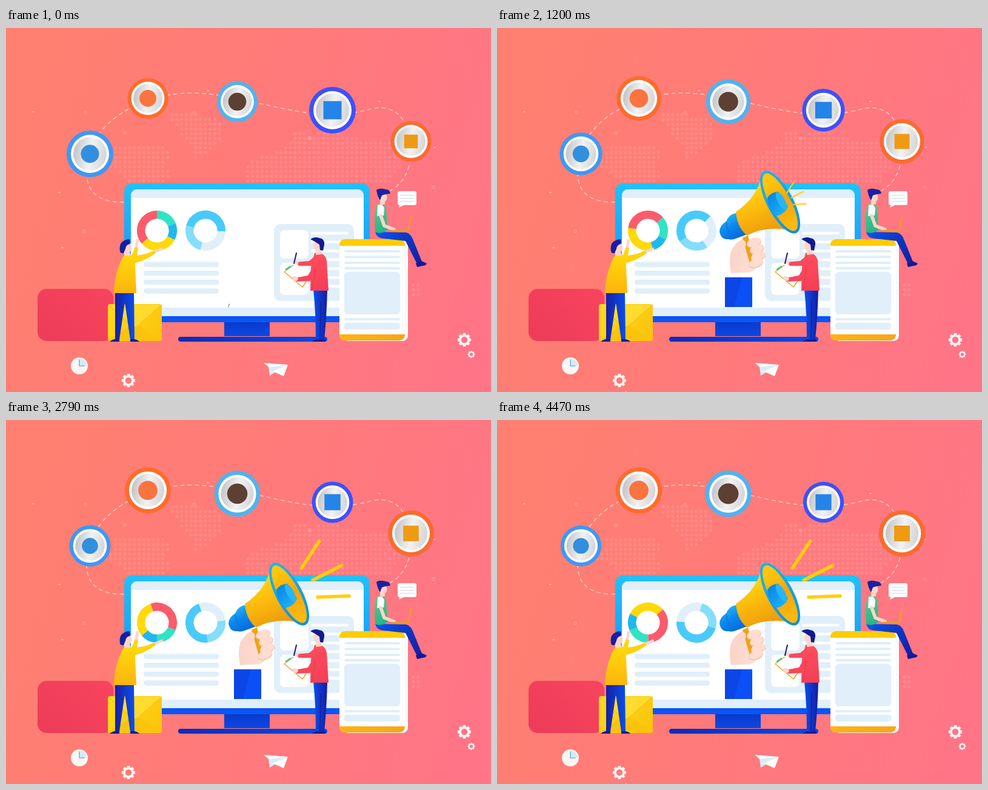
An HTML page with a canvas for the animation above (4500 ms loop, 800 px wide and 600 px high).

```html
<!DOCTYPE html>
<html lang="en">
<head>
<meta charset="utf-8">
<title>Marketing desk</title>
<style>
html, body { margin: 0; width: 100%; height: 100%; overflow: hidden; background: #ff7b7b; }
canvas { display: block; width: 800px; height: 600px; }
</style>
</head>
<body>
<canvas id="stage" width="800" height="600"></canvas>
<script>
const LOOP = 4500, STEP = 30, TAU = Math.PI * 2;
const PALE = '#e0eff9', NAVY = '#14189a', SKIN = '#fcd5cb';
const stage = document.getElementById('stage').getContext('2d');
let c = stage;

const clamp = v => Math.max(0, Math.min(1, v));

function grad(x0, y0, x1, y1, ...colors) {
  const g = c.createLinearGradient(x0, y0, x1, y1);
  colors.forEach((color, i) => g.addColorStop(i / (colors.length - 1), color));
  return g;
}

function shape(d, fill) {
  c.fillStyle = fill;
  c.fill(new Path2D(d));
}

function stroke(d, color, width, cap = 'round') {
  c.strokeStyle = color;
  c.lineWidth = width;
  c.lineCap = cap;
  c.lineJoin = 'round';
  c.stroke(new Path2D(d));
}

function box(x0, y0, x1, y1, r, fill) {
  c.fillStyle = fill;
  c.beginPath();
  c.roundRect(x0, y0, x1 - x0, y1 - y0, r);
  c.fill();
}

function oval(x, y, rx, ry, fill, turn = 0) {
  c.fillStyle = fill;
  c.beginPath();
  c.ellipse(x, y, rx, ry, turn, 0, TAU);
  c.fill();
}

const disc = (x, y, r, fill) => oval(x, y, r, r, fill);

// Runs a drawing with everything scaled about one point.
function scaled(x, y, s, draw) {
  c.save();
  c.translate(x, y);
  c.scale(s, s);
  c.translate(-x, -y);
  draw();
  c.restore();
}

function layer(draw) {
  const canvas = document.createElement('canvas');
  canvas.width = 800;
  canvas.height = 600;
  c = canvas.getContext('2d');
  draw();
  c = stage;
  return canvas;
}

function worldMap() {
  const land = new Path2D(
    'M172 192 L263 190 L270 212 L262 228 L273 246 L250 256 L200 256 L190 240 L158 228 L176 212Z ' +
    'M272 143 L300 139 L338 150 L357 152 L358 182 L330 205 L314 215 L300 186 L275 158Z ' +
    'M400 218 L440 206 L468 190 L476 172 L494 169 L500 178 L530 168 L580 182 L658 192 L655 220 L632 256 L396 256Z ' +
    'M668 420 L680 420 L680 441 L668 441Z');
  for (let y = 143; y < 445; y += 7.8) {
    for (let x = 126; x < 690; x += 7.8) {
      if (c.isPointInPath(land, x, y)) disc(x, y, 2.7, 'rgba(255,190,185,.22)');
    }
  }
}

function specks() {
  c.strokeStyle = 'rgba(255,255,255,.32)';
  c.lineWidth = 1;
  for (const [x, y] of [[131, 139], [196, 173], [310, 139], [501, 182], [705, 262], [129, 335]]) {
    c.beginPath();
    c.arc(x, y, 2.4, 0, TAU);
    c.stroke();
  }
  for (const [x, y] of [[45, 138], [333, 103], [616, 121], [707, 197], [93, 362], [88, 271]]) {
    oval(x, y, 2, .9, 'rgba(255,255,255,.45)');
  }
}

function gear(x, y, r) {
  c.save();
  c.translate(x, y);
  c.strokeStyle = c.fillStyle = '#fff6f4';
  c.lineWidth = r * .34;
  c.beginPath();
  c.arc(0, 0, r * .65, 0, TAU);
  c.stroke();
  for (let i = 0; i < 8; i++) {
    c.rotate(TAU / 8);
    c.fillRect(-r * .21, -r, r * .42, r * .34);
  }
  c.restore();
}

function monitor() {
  box(195, 256, 600, 485, 13, grad(0, 256, 0, 480, '#20c2fb', '#19a0fa', '#0a55f7'));
  box(195, 470, 600, 485, [0, 0, 10, 10], '#0a55f7');
  box(206, 266, 590, 475, [10, 10, 0, 0], '#fff');
  box(206, 266, 590, 280, [10, 10, 0, 0], PALE);
  box(206, 461, 590, 475, 0, PALE);
  box(360, 485, 435, 508, 0, grad(0, 485, 0, 508, '#0a3ac8', '#0a48e8'));
  box(284, 509, 530, 517, 4, grad(284, 0, 530, 0, '#0f2ab8', '#0a4ae6'));
  for (let i = 0; i < 4; i++) box(227, 385.5 + i * 14.6, 351, 394 + i * 14.6, 4, PALE);
  box(442, 323, 574, 450, 11, PALE);
  box(452, 333, 499, 380, 7, '#fff');
  box(452, 387, 499, 440, 7, '#fff');
  for (let y = 336; y < 435; y += 14.6) box(503, y, 565, y + 4.5, 2, '#fff');
}

function backdrop() {
  c.fillStyle = grad(0, 180, 800, 420, '#ff8070', '#ff7a7a', '#ff7587');
  c.fillRect(0, 0, 800, 600);
  worldMap();
  specks();
  c.setLineDash([7, 5]);
  stroke('M195 287 C150 288 132 268 133 236 C134 188 165 150 212 129 C262 105 310 102 368 114 ' +
    'C430 126 465 136 500 140 C540 145 570 142 600 134 C645 122 668 155 668 205 Q666 250 634 268',
    'rgba(255,235,230,.72)', 1.5, 'butt');
  c.setLineDash([]);
  monitor();
}

function tablet() {
  box(556, 350, 663, 516, 9, grad(650, 0, 663, 0, '#dcecf6', '#ffffff'));
  box(550, 348, 658, 515, 9, '#fff');
  box(550, 348, 658, 359, [9, 9, 0, 0], '#ffcc00');
  box(550, 505, 658, 515, [0, 0, 9, 9], grad(550, 0, 658, 0, '#ffb30f', '#f9a51a'));
  for (const y of [366, 375.5, 385, 394]) box(558, y, 650, y + 4, 2, PALE);
  box(558, 402, 650, 472, 6, PALE);
  box(558, 478, 650, 482, 2, PALE);
  box(558, 486, 650, 497, 4, PALE);
}

function redTile() {
  box(52, 430, 177, 516, 15, grad(150, 430, 80, 516, '#f7435d', '#ed3d59'));
}

function envelope() {
  box(168, 455, 257, 516, 4, grad(168, 455, 257, 516, '#ffd91c', '#fbc30c'));
  shape('M169 515 L212 486 L257 515Z', '#f9c40b');
  shape('M169 456 L256 456 L217 491 Q212 495 207 491Z', '#ffdb2e');
  stroke('M170 457 L207 491 Q212 495 217 491 L256 457', '#efbb0b', 1);
}

function reachingMan() {
  stroke('M212 379 L217 350', SKIN, 4.5);
  stroke('M240 371 L257 364', SKIN, 4.5);
  shape('M180 436 L211 436 L212 514 L205 514 L196 452 L187 514 L180 514Z', grad(180, 0, 213, 0, '#1520a5', '#0a50ed'));
  shape('M171 517 Q178 511 187 513 L187 517Z M205 517 L205 513 Q215 512 220 517Z', NAVY);
  shape('M193 377 Q204 371 213 376 L213 392 L215 437 L178 437 Q179 403 193 377Z', grad(0, 374, 0, 437, '#ffd90c', '#fbb50d'));
  shape('M206 376 Q228 375 244 367 L247 371 Q229 384 211 388Z', '#ffd20b');
  shape('M206 378 L213 361 L218 363 L215 382Z', '#ffd60c');
  shape('M195 366 L203 366 L206 375 L195 376Z', SKIN);
  oval(201, 362, 6.5, 8, SKIN);
  shape('M188 368 Q185 351 202 348 Q206 348 204 356 Q198 357 197 364 L194 371 Q189 372 188 368Z', '#161fa0');
}

function writingMan() {
  shape('M507 431 L530 431 Q529 475 525 514 L511 514 Q511 470 507 431Z', grad(507, 0, 530, 0, '#0a50ed', '#151ca0'));
  stroke('M519 450 L518 513', '#151c96', 1.2);
  shape('M504 517 Q510 512 518 514 L527 513 L527 517Z', NAVY);
  shape('M509 371 Q525 368 529 383 L532 433 L502 433 L503 394Z', grad(500, 370, 532, 433, '#ff515f', '#f33d56'));
  shape('M459 402 L474 391 L501 410 L489 427Z', '#fff');
  stroke('M474 391 L459 402 L489 427 L501 410', '#f7a11d', 1.5);
  stroke('M462 398 L469 393', '#37c6b4', 2.5);
  shape('M512 374 L509 392 L483 392 L478 386 L500 384Z', '#fb4a5c');
  oval(478, 386, 4.5, 3, SKIN, .5);
  shape('M518 382 Q529 386 523 397 L502 417 L479 418 L477 412 L498 408 L509 390Z', '#f94659');
  oval(477, 413, 5, 3.5, SKIN, .4);
  stroke('M475 388 L479 371', '#161c85', 2);
  stroke('M510 397 L505 432', '#df3651', .8);
  shape('M512 365 L520 365 L521 373 L511 374Z', SKIN);
  oval(514, 359, 7, 8.5, SKIN);
  shape('M502 348 Q510 343 516 346 Q526 347 525 357 L523 367 L518 366 L517 357 Q510 352 502 348Z', '#111b91');
}

function seatedMan() {
  shape('M609 336 L659 337 Q667 338 671 348 L686 385 L678 389 L659 351 L622 347 Q611 346 609 336Z',
    grad(610, 335, 688, 388, '#0a55ea', '#151ca0'));
  shape('M676 388 L685 384 L694 388 L692 391 L678 394Z', NAVY);
  shape('M612 291 Q622 287 627 295 L629 333 Q618 341 609 336 Q606 303 612 291Z', grad(608, 290, 628, 336, '#58cb92', '#24b486'));
  shape('M613 292 Q621 289 624 297 L623 309 L612 310Z', '#fff');
  stroke('M618 309 L624 326 L640 332', SKIN, 5.5);
  stroke('M636 334 L664 334', '#f29a22', 2.5);
  stroke('M664 333 L668 309', '#f3a020', 2.2);
  shape('M617 282 L625 282 L625 290 L617 293Z', SKIN);
  oval(622, 279, 6.5, 8, SKIN);
  shape('M611 267 Q616 263 626 266 Q633 266 634 273 Q625 274 620 276 L617 284 Q612 276 611 267Z', '#1a22a2');
}

function bubble() {
  box(646, 269, 677, 292, 3, '#fff');
  shape('M650 291 L648 296 L658 291Z', '#fff');
  for (const y of [275, 280, 285]) box(650, y, 673, y + 1.3, 0, '#cfe2f0');
}

function smallThings() {
  disc(121, 557, 14, '#fff7f5');
  shape('M121 557 L121 545 A12 12 0 0 1 133 557Z', '#d8eaf6');
  stroke('M121 547 L121 557 L129 557', '#68b8e8', 1.6);
  gear(202, 581, 11);
  gear(756, 514, 11);
  gear(767.5, 538, 5.8);
  oval(213, 601, 3, 1.5, '#fff3f0');
  shape('M425 552 L465 555 L437 562Z', '#fff');
  shape('M433 559 L465 555 L435 573Z', '#dcebf5');
  shape('M440 566 L465 555 L458 574Z', '#fff');
}

function foreground() {
  redTile();
  envelope();
  reachingMan();
  tablet();
  writingMan();
  seatedMan();
  bubble();
  smallThings();
}

// Each badge: centre, ring colour, mark colour, mark half-size, square mark, starts small.
const badges = [
  { x: 138.5, y: 207.5, ring: '#3d98f6', mark: '#318fdf', half: 15 },
  { x: 234, y: 116, ring: '#ff6c2b', mark: '#fb7440', half: 16, small: true },
  { x: 381.5, y: 121.5, ring: '#50b3ef', mark: '#5c4034', half: 17, small: true },
  { x: 538.5, y: 135.5, ring: '#3d50fe', mark: '#2584e9', half: 15, square: true },
  { x: 668, y: 187, ring: '#fb6b2d', mark: '#ee9a14', half: 13, square: true, small: true }
];

function badge({ x, y, ring, mark, half, square, small }, pulse) {
  const r = 33.5 + 5 * (small ? 1 - pulse : pulse);
  scaled(x, y, r / 38.5, () => {
    disc(x, y, 38.5, ring);
    disc(x, y, 31.5, '#fff');
    disc(x, y, 27.5, grad(x - 25, y, x + 25, y + 8, '#c9c9cb', '#f2f2f3', '#d6d6d8'));
    if (square) box(x - half, y - half, x + half, y + half, 0, mark);
    else disc(x, y, half, mark);
  });
}

// Slices are [start degree clockwise from the top, colour].
function donut(x, y, turn, slices) {
  c.lineWidth = 13.5;
  c.lineCap = 'butt';
  slices.forEach(([from, color], i) => {
    const to = i + 1 < slices.length ? slices[i + 1][0] : slices[0][0] + 360;
    c.strokeStyle = color;
    c.beginPath();
    c.arc(x, y, 26.3, (from + turn - 90) * TAU / 360, (to + turn - 90) * TAU / 360);
    c.stroke();
  });
}

function megaphone() {
  box(376, 411, 421, 460, 0, '#0a50f6');
  shape('M376 411 L404 411 L391 460 L376 460Z', 'rgba(12,40,180,.25)');
  // Wrist and palm behind the grip
  shape('M386 368 Q394 352 408 346 L430 352 L428 394 Q424 403 412 403 L386 404 Q382 384 386 368Z', grad(384, 0, 440, 0, '#fbd3c8', '#ffe3d8'));
  shape('M405 346 L414 342 L425 392 L419 395Z', '#f1a30e');
  for (const [x, y] of [[424, 354], [429, 365], [431, 377], [427, 388]]) {
    oval(x, y, 12.5, 7.5, '#f4bfb2', -.35);
    oval(x, y - 1, 12, 6.8, '#ffdcd0', -.35);
  }
  oval(400, 362, 8, 14, '#fdd5c9', .65);
  // Rear cap
  shape('M396 305 Q383 306 378 319 Q367 325 367 336 Q370 350 381 348 Q388 350 394 347 L413 340Z',
    grad(375, 308, 398, 347, '#28baf8', '#0b88ec', '#0868dc'));
  stroke('M378 320 Q380 338 391 347', '#0877df', 1.4);
  // Horn, its coloured rim and the mouth
  shape('M437 240 Q431 278 394 303 Q396 328 412 342 Q450 323 494 336Z',
    grad(418, 264, 447, 336, '#ffd512', '#fbb80d', '#ec9c0e'));
  const tilt = 1.08;
  oval(467, 287, 57.5, 21.5, grad(440, 236, 496, 338, '#19b4f4', '#0d8fe2'), tilt);
  oval(467, 287, 53, 17, grad(445, 255, 488, 323, '#ffc60c', '#f3a50c', '#fbba10'), tilt);
  shape('M446 280 Q452 270 464 270 L480 294 Q476 306 461 310 Q447 299 446 280Z', grad(448, 275, 478, 306, '#0785e6', '#20b5f6'));
  oval(469, 285, 16, 6, '#27b6f5', tilt);
}

function rays() {
  stroke('M487.5 244 L516.5 200 M506 264 L553.5 240 M514 292 L566 290', '#ffcf08', 5.5);
}

const back = layer(backdrop), front = layer(foreground);

function render(t) {
  c.drawImage(back, 0, 0);
  const pulse = Math.abs(1 - (t / 900) % 2);
  badges.forEach(b => badge(b, pulse));
  const turn = 180 * t / LOOP;
  donut(249, 334, turn, [[0, '#30e3c5'], [68, '#20b8ec'], [118, '#ffda08'], [230, '#fb5b6c']]);
  donut(329, 334, -turn, [[92, PALE], [195, '#85ddfc'], [285, '#48cafb']]);
  scaled(366, 460, clamp(.025 + .975 * t / 900), megaphone);
  const grow = clamp((t - 600) / 1500);
  if (grow > 0) scaled(472, 290, grow, rays);
  c.drawImage(front, 0, 0);
}

const started = performance.now();
function tick() {
  const t = (performance.now() - started) % LOOP;
  render(Math.floor(t / STEP) * STEP);
  requestAnimationFrame(tick);
}
tick();
</script>
</body>
</html>
```
